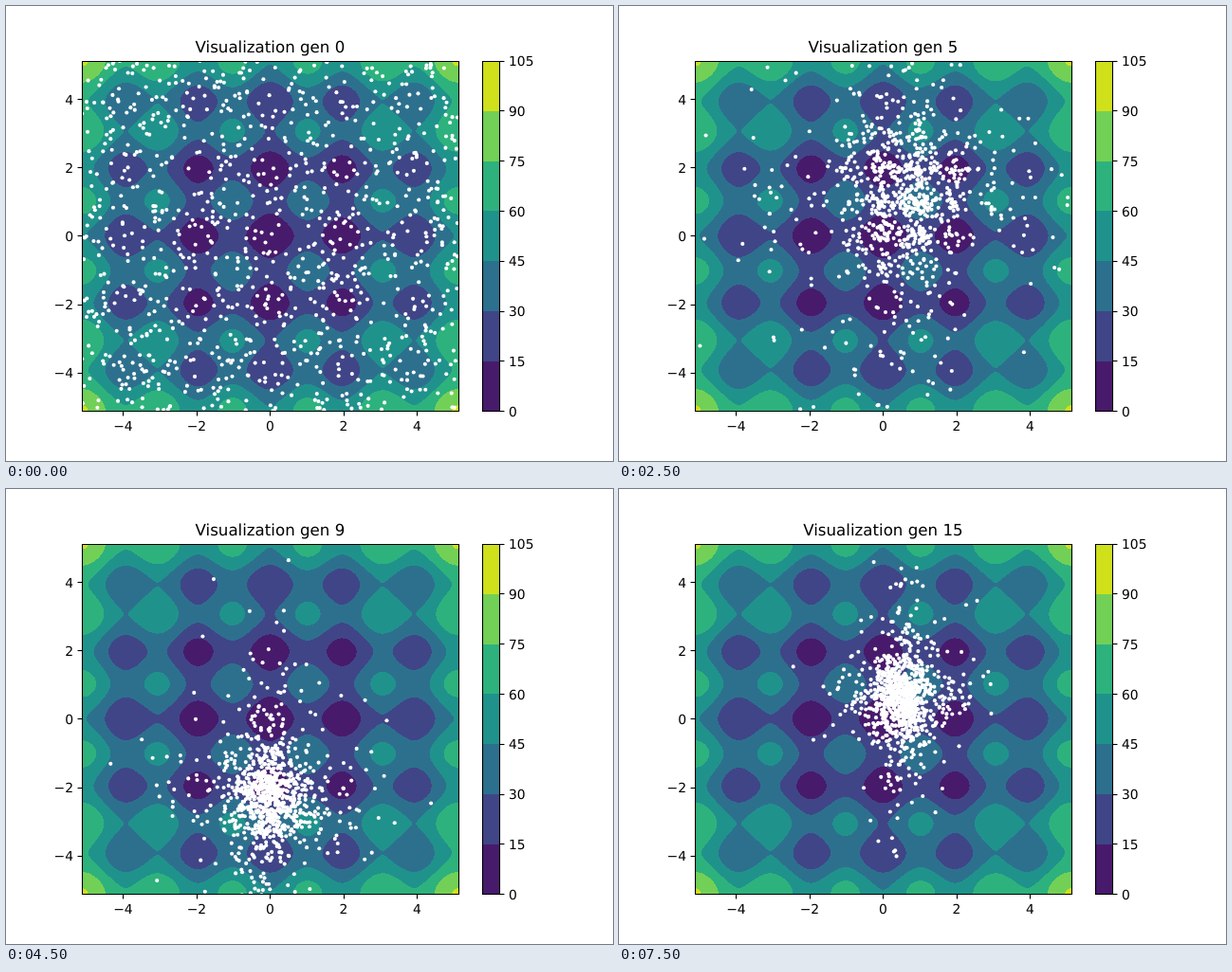
An HTML page with a canvas for the animation above (8 s loop, 640 by 480 pixels).

```html
<!DOCTYPE html>
<html lang="en">
<head>
<meta charset="utf-8">
<title>Visualization</title>
<style>
  html, body { margin: 0; width: 100%; height: 100%; overflow: hidden; background: #fff; }
  canvas, svg { position: absolute; left: 0; top: 0; width: 640px; height: 480px; }
  text { font: 13.89px "DejaVu Sans", sans-serif; fill: #000; text-rendering: geometricPrecision; }
  #title { font-size: 16.67px; }
  #axes path { fill: none; stroke: #000; stroke-width: 1.11; }
</style>
</head>
<body>
<canvas id="plot" width="640" height="480"></canvas>
<svg id="axes" viewBox="0 0 640 480">
  <text id="title" x="278.4" y="49" text-anchor="middle">Visualization gen 0</text>
</svg>
<script>
const LEFT = 80, TOP = 57.6, WIDTH = 396.8, HEIGHT = 369.6, LIMIT = 5.12;
const BOTTOM = TOP + HEIGHT, BAR_LEFT = 502, BAR_RIGHT = 520;
const GEN_MS = 500, GENS = 16, POPULATION = 1000, STEP = 15;
const COLORS = ['#481a6c', '#404588', '#2d708e', '#20928c', '#2db27d', '#73d056', '#d0e11c'];

// Where the swarm centres itself, every second generation from the third on
const PATH = [[.1, .4], [.6, 1], [-.35, -.3], [0, -2.2], [-.15, 0], [.2, .3], [.5, .6]];

const px = x => LEFT + WIDTH * (x + LIMIT) / (2 * LIMIT);
const py = y => TOP + HEIGHT * (LIMIT - y) / (2 * LIMIT);
const crisp = v => Math.floor(v + .5) + .5;
const lerp = (a, b, t) => a + (b - a) * t;

const ctx = document.getElementById('plot').getContext('2d');
const axes = document.getElementById('axes');
const title = document.getElementById('title');

function addNode(tag, attrs, text = '') {
  const node = document.createElementNS('http://www.w3.org/2000/svg', tag);
  for (const name in attrs) node.setAttribute(name, attrs[name]);
  node.textContent = text;
  axes.append(node);
}
const addLine = d => addNode('path', { d });
const addLabel = (x, y, anchor, text) => addNode('text', { x, y, 'text-anchor': anchor }, text);
const besideTick = y => Math.round(y + 5.5);

function drawFrame(x0, y0, x1, y1) {
  addLine(`M${crisp(x0)} ${crisp(y0)}H${crisp(x1)}V${crisp(y1)}H${crisp(x0)}Z`);
}

function drawAxes() {
  drawFrame(LEFT, TOP, LEFT + WIDTH, BOTTOM);
  drawFrame(BAR_LEFT, TOP, BAR_RIGHT, BOTTOM);
  for (let v = -4; v <= 4; v += 2) {
    const label = String(v).replace('-', '\u2212');
    addLine(`M${crisp(px(v))} 427.5v5`);
    addLabel(px(v), 448, 'middle', label);
    addLine(`M80.5 ${crisp(py(v))}h-5`);
    addLabel(71, besideTick(py(v)), 'end', label);
  }
  for (let i = 0; i <= COLORS.length; i++) {
    const y = BOTTOM - HEIGHT * i / COLORS.length;
    addLine(`M520.5 ${crisp(y)}h5`);
    addLabel(530, besideTick(y), 'start', i * STEP);
  }
}

function drawBar() {
  const edge = i => Math.ceil(BOTTOM - HEIGHT * i / COLORS.length - .01);
  COLORS.forEach((color, i) => {
    ctx.fillStyle = color;
    ctx.fillRect(BAR_LEFT, edge(i + 1), BAR_RIGHT - BAR_LEFT, edge(i) - edge(i + 1));
  });
}

function makeField() {
  const image = ctx.createImageData(397, 370);
  const rgb = COLORS.map(c => [1, 3, 5].map(i => parseInt(c.slice(i, i + 2), 16)));
  const wave = v => 10 + v * v - 10 * Math.cos(Math.PI * v);
  for (let j = 0, k = 0; j < image.height; j++) {
    const fy = wave(LIMIT - (j + 58.5 - TOP) * 2 * LIMIT / HEIGHT);
    for (let i = 0; i < image.width; i++, k += 4) {
      const fx = wave((i + .5) * 2 * LIMIT / WIDTH - LIMIT);
      image.data.set(rgb[Math.min(6, Math.floor((fx + fy) / STEP))], k);
      image.data[k + 3] = 255;
    }
  }
  return image;
}

function seeded(seed) {
  return () => {
    seed = (seed + 0x6D2B79F5) | 0;
    let t = Math.imul(seed ^ (seed >>> 15), 1 | seed);
    t = (t + Math.imul(t ^ (t >>> 7), 61 | t)) ^ t;
    return ((t ^ (t >>> 14)) >>> 0) / 4294967296;
  };
}

function centreAt(gen) {
  const at = Math.max(0, (gen - 3) / 2);
  const a = PATH[Math.floor(at)], b = PATH[Math.ceil(at)];
  return a.map((v, i) => lerp(v, b[i], at % 1));
}

function population(gen) {
  const rand = seeded(gen * 7919 + 11);
  const gauss = () => Math.sqrt(-2 * Math.log(1 - rand())) * Math.cos(2 * Math.PI * rand());
  const [cx, cy] = centreAt(gen);
  const spread = .33 + 1.6 * Math.exp(-gen / 4);
  const scattered = Math.exp(-gen / 1.3);
  // Whole numbers attract, most strongly in the early generations
  const pull = .15 * gen * Math.exp(-gen / 2);
  const gather = v => v - pull * Math.sin(2 * Math.PI * v);
  const anywhere = () => (rand() * 2 - 1) * LIMIT;
  // Each axis strays on its own, which gives the swarm its cross shape
  const near = (centre, sd) => centre + gauss() * sd * (rand() < .28 ? 2.8 : 1);
  return Array.from({ length: POPULATION }, () => {
    const point = rand() < scattered
      ? [anywhere(), anywhere()]
      : [near(cx, spread), near(cy, spread * 1.6)];
    return point.map(gather);
  });
}

function drawGeneration(gen) {
  title.textContent = `Visualization gen ${gen}`;
  ctx.putImageData(field, 80, 58);
  ctx.save();
  ctx.beginPath();
  ctx.rect(LEFT, TOP, WIDTH, HEIGHT);
  ctx.clip();
  ctx.fillStyle = '#fff';
  for (const [x, y] of population(gen)) {
    ctx.beginPath();
    ctx.arc(px(x), py(y), 2.05, 0, 2 * Math.PI);
    ctx.fill();
  }
  ctx.restore();
}

const field = makeField();
let shown = -1;

function tick() {
  const gen = Math.floor(performance.now() / GEN_MS) % GENS;
  if (gen !== shown) drawGeneration(shown = gen);
  requestAnimationFrame(tick);
}

drawAxes();
drawBar();
tick();
</script>
</body>
</html>
```
